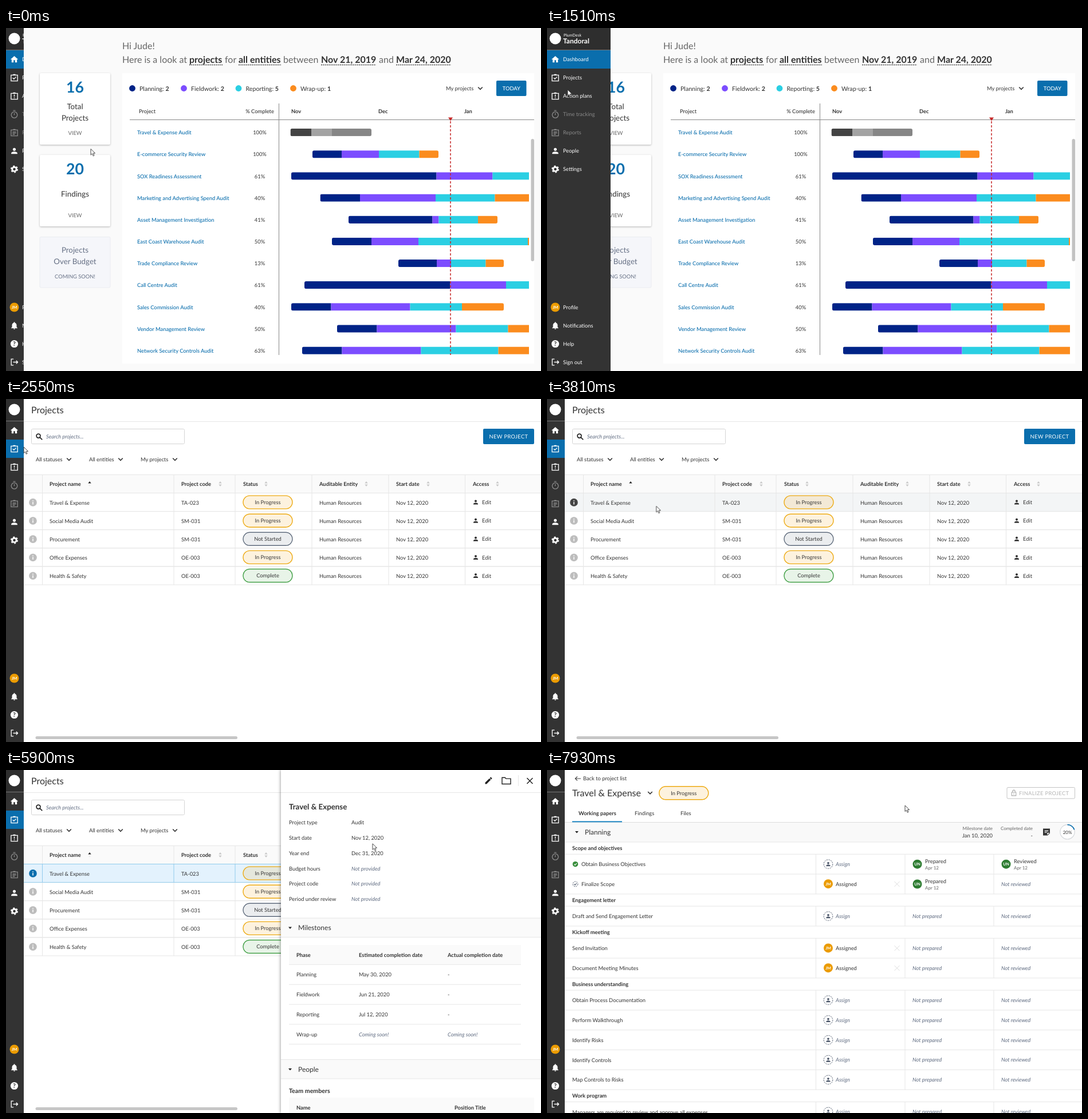
An HTML page for the animation above (8 s loop, 934 by 600 pixels).

```html
<!DOCTYPE html>
<html lang="en">
<head>
<meta charset="utf-8">
<title>Audit dashboard</title>
<style>
html, body { margin: 0; width: 100%; height: 100%; overflow: hidden; background: #fff; }
svg { display: block; width: 934px; height: 600px; }
text { font: 9.33px Lato, "Open Sans", sans-serif; fill: #333; text-rendering: geometricPrecision; white-space: pre; }
.b { font-weight: 700; }
.h { font-weight: 500; }
.i { font-style: italic; fill: #5f6b80; }
.m { text-anchor: middle; }
.e { text-anchor: end; }
.w { fill: #fff; }
.blue { fill: #0a6ead; }
.soft { fill: #666; }
.slate { fill: #667085; }
.caps { letter-spacing: .37px; }
.s7 { font-size: 7px; }
.s8 { font-size: 8px; }
.s11 { font-size: 10.67px; }
.s12 { font-size: 12px; }
.s13 { font-size: 13.33px; }
.s16 { font-size: 16px; }
.s27 { font-size: 26.67px; }
.card { filter: drop-shadow(0 1px 1.5px rgba(0,0,0,.28)); }
.edge { filter: drop-shadow(-1px 0 2.5px rgba(0,0,0,.35)); }

#drawer, .layer, #hover, #chosen, #panel, #detail, #cx, #cy, #ring { animation: 8s linear infinite; }
#drawer { animation-name: drawer; }
.layer { animation-name: dissolve; }
#hover { animation-name: hover; }
#chosen { animation-name: chosen; }
#panel { animation-name: panel; }
#detail { animation-name: detail; animation-timing-function: step-end; }
#ring { animation-name: ring; animation-timing-function: step-end; }
#cx { animation-name: cx; }
#cy { animation-name: cy; }

@keyframes drawer {
  0%, 8.75% { clip-path: inset(0 80px 0 0); animation-timing-function: ease-in-out; }
  13.5%, 100% { clip-path: inset(0 0 0 0); }
}
@keyframes dissolve { 0%, 27.5% { opacity: 0; } 31.5%, 100% { opacity: 1; } }
@keyframes hover {
  0%, 42.5% { opacity: 0; }
  43.5%, 58.375% { opacity: 1; animation-timing-function: cubic-bezier(.65,0,.35,1); }
  64.5%, 100% { opacity: 0; }
}
@keyframes chosen {
  0%, 58.375% { opacity: 0; animation-timing-function: cubic-bezier(.65,0,.35,1); }
  64.5%, 100% { opacity: 1; }
}
@keyframes panel {
  0%, 58.3% { transform: translateX(480px); }
  58.375% { transform: translateX(454px); animation-timing-function: cubic-bezier(.65,0,.35,1); }
  64.5%, 100% { transform: none; }
}
@keyframes detail { 0% { opacity: 0; } 89.625%, 100% { opacity: 1; } }
@keyframes ring {
  0%, 28% { opacity: 0; }
  25.625%, 87.375% { opacity: 1; }
  89.625%, 100% { opacity: 0; }
}
@keyframes cx {
  0%, .75% { transform: translateX(148px); animation-timing-function: cubic-bezier(.4,0,.5,.97); }
  18.875% { transform: translateX(36px); animation-timing-function: ease-out; }
  21.9%, 36% { transform: translateX(31px); animation-timing-function: ease-in-out; }
  46.25% { transform: translateX(196px); animation-timing-function: ease-in-out; }
  56.6%, 66.9% { transform: translateX(50px); animation-timing-function: cubic-bezier(.4,0,.8,.85); }
  73.75% { transform: translateX(639px); animation-timing-function: cubic-bezier(.33,.45,.67,.85); }
  77.5% { transform: translateX(836px); animation-timing-function: ease-out; }
  83.5%, 96% { transform: translateX(874px); animation-timing-function: ease-in; }
  99.1%, 100% { transform: translateX(625px); }
}
@keyframes cy {
  0%, .75% { transform: translateY(211.5px); animation-timing-function: cubic-bezier(.5,0,.7,.85); }
  18.875% { transform: translateY(108px); animation-timing-function: ease-out; }
  21.9%, 36% { transform: translateY(84px); animation-timing-function: ease-in-out; }
  45.5% { transform: translateY(188px); animation-timing-function: ease-in-out; }
  56.6%, 66.9% { transform: translateY(180px); animation-timing-function: ease-in; }
  73.75% { transform: translateY(129px); }
  77.5% { transform: translateY(61px); animation-timing-function: ease-out; }
  83.5%, 96% { transform: translateY(14px); animation-timing-function: ease-in; }
  99.1%, 100% { transform: translateY(62px); }
}
</style>
</head>
<body>
<svg id="stage" viewBox="0 0 934 600" xmlns="http://www.w3.org/2000/svg"></svg>
<script>
const BLUE = '#0a6ead', ORANGE = '#eb9b00', GREEN = '#2e7d32', LINE = '#e6e6e6', INK = '#333';

// Drawing helpers; text is centred vertically on y.
const text = (x, y, s, cls = '') => `<text x="${x}" y="${y}" dy=".355em" class="${cls}">${s}</text>`;
const rect = (x, y, x2, y2, fill, more = '') =>
  `<rect x="${x}" y="${y}" width="${x2 - x}" height="${y2 - y}" fill="${fill}" ${more}/>`;
const path = (d, stroke, width = 1, more = '') =>
  `<path d="${d}" fill="none" stroke="${stroke}" stroke-width="${width}" ${more}/>`;
const fill = (d, color) => `<path d="${d}" fill="${color}"/>`;
const dot = (x, y, r, color, more = '') => `<circle cx="${x}" cy="${y}" r="${r}" fill="${color}" ${more}/>`;
const hline = (x, x2, y, color = LINE) => path(`M${x} ${y}H${x2}`, color);
const vline = (x, y, y2, color = LINE) => path(`M${x} ${y}V${y2}`, color);
const layer = s => `<g class="layer">${s}</g>`;
const each = (list, fn) => list.map(fn).join('');
const chevron = (x, y) => path(`M${x - 3.8} ${y - 2}l3.8 3.8 3.8-3.8`, INK, 1.6);
const caret = (x, y) => fill(`M${x - 3} ${y - 1.5}h6l-3 3.4z`, '#222');
const badge = (x, y, s, color) => dot(x, y, 8, color) + text(x, y, s, 'b s7 w m');

// Icons on a 24-unit grid.
const SHAPES = {
  home: 'M10 20v-6h4v6h5v-8h3L12 3 2 12h3v8z',
  person: 'M12 12c2.2 0 4-1.8 4-4s-1.8-4-4-4-4 1.8-4 4 1.8 4 4 4zm0 2c-2.7 0-8 1.3-8 4v2h16v-2c0-2.7-5.3-4-8-4z',
  bell: 'M12 22c1.1 0 2-.9 2-2h-4c0 1.1.9 2 2 2zm6-6v-5c0-3.1-1.6-5.6-4.5-6.3V4a1.5 1.5 0 0 0-3 0v.7C7.6 5.4 6 7.9 6 11v5l-2 2v1h16v-1z',
  pencil: 'M3 17.2V21h3.8L17.8 9.9l-3.7-3.7zM20.7 7c.4-.4.4-1 0-1.4l-2.3-2.3c-.4-.4-1-.4-1.4 0l-1.9 1.8 3.8 3.8z',
  note: 'M3 3h18v12l-6 6H3zM7 8v2h10V8zM7 12v2h6v-2zM14 20l6-6h-6z'
};
const STROKES = {
  tasks: 'M3.5 5h17v15.500h-17zM9 3.500h6M8 12.500l3 3 5.500-6',
  plans: 'M3.5 5h17v15.500h-17zM9 3.500h6M12 8v5.500M12 15.500v2',
  report: 'M3.5 5h17v15.500h-17zM9 3.500h6M7.500 10h9M7.500 13h9M7.500 16.500h6',
  timer: 'M12 5.500a8 8 0 1 0 .01 0M12 9v5M9 2h6',
  out: 'M10 4H4v16h6M9 12h12M17 8l4 4-4 4',
  search: 'M9.500 3.500a6 6 0 1 0 .01 0M14 14l7 7',
  folder: 'M2 5h7l2 2.500h11V20H2z',
  lock: 'M5 10h14v11H5zM8 10V7a4 4 0 0 1 8 0v3M12 14v3'
};
function icon(name, x, y, color, size = 16, width = 2) {
  const body = SHAPES[name]
    ? `<path d="${SHAPES[name]}" fill="${color}" fill-rule="evenodd"/>`
    : path(STROKES[name], color, width);
  return `<g transform="translate(${x - size / 2} ${y - size / 2}) scale(${size / 24})">${body}</g>`;
}
const gear = (x, y) =>
  `<circle cx="${x}" cy="${y}" r="3.7" fill="none" stroke="#fff" stroke-width="2.8"/>` +
  `<circle cx="${x}" cy="${y}" r="5.600" fill="none" stroke="#fff" stroke-width="1.8" stroke-dasharray="2.93"/>`;

// Sidebar
const NAV = [['home', 'Dashboard'], ['tasks', 'Projects'], ['plans', 'Action plans'], ['timer', 'Time tracking'],
  ['report', 'Reports'], ['person', 'People'], ['gear', 'Settings']];
const FOOT = [['me', 'Profile'], ['bell', 'Notifications'], ['help', 'Help'], ['out', 'Sign out']];
function sidebar(active, wide) {
  const w = wide ? 111 : 31;
  const glyph = (name, y) => {
    if (name === 'gear') return gear(14.5, y);
    if (name === 'me') return badge(14.5, y, 'JM', ORANGE);
    if (name === 'help') return dot(14.5, y, 6.6, '#fff') + `<text x="14.5" y="${y}" dy=".355em" class="b m s11">?</text>`;
    return icon(name, 14.5, y, '#fff');
  };
  const item = ([name, label], y) =>
    `<g opacity="${name === 'timer' || name === 'report' ? .42 : 1}">${glyph(name, y)}${wide ? text(28, y, label, 'w') : ''}</g>`;
  return rect(0, 0, w, 600, '#333') + rect(0, 0, w, 38, '#2e2e2e') + hline(0, w, 38.5, '#777') +
    dot(14.5, 18.5, 10, '#fff') +
    (wide ? text(29, 13, 'PlumDesk', 's7 w') + text(28, 23, 'Tandoral', 'b s12 w') : '') +
    (active < 0 ? '' : rect(0, 39 + 32 * active, w, 71 + 32 * active, BLUE)) +
    each(NAV, (n, i) => item(n, 55 + 32 * i)) + each(FOOT, (n, i) => item(n, 488.5 + 32 * i));
}

// Dashboard
const PHASES = ['#002387', '#7c4dff', '#2bcfe3', '#fb8c1e'];
const GREYS = ['#434343', '#a3a3a3', '#868686'];
const BARS = [
  ['Travel &amp; Expense Audit', 100, 496.5, 533.5, 569, 638],
  ['E-commerce Security Review', 100, 535, 586, 651, 721.5, 755],
  ['SOX Readiness Assessment', 61, 498, 751.5, 849.5, 913],
  ['Marketing and Advertising Spend Audit', 40, 548.5, 618, 750, 853.5, 913],
  ['Asset Management Investigation', 41, 598, 744.5, 755.5, 824, 858],
  ['East Coast Warehouse Audit', 50, 569, 638, 720, 911, 913],
  ['Trade Compliance Review', 13, 685, 752, 777, 837.5, 869],
  ['Call Centre Audit', 61, 521, 775.5, 873, 913],
  ['Sales Commission Audit', 40, 498, 567.5, 705.5, 796, 869],
  ['Vendor Management Review', 50, 578, 647.5, 785.5, 876.5, 913],
  ['Network Security Controls Audit', 63, 517, 586.5, 724.5, 859.5, 913]
];
function bar([name, done, ...x], i) {
  const y = 183 + 38.15 * i, colors = i ? PHASES : GREYS;
  const right = x[x.length - 1] < 913 ? 3 : 0;
  const parts = each(x.slice(1), (end, k) => rect(x[k], y - 7, end, y + 6.3, colors[k]));
  return text(229, y, name, 'h blue') + text(443, y, done + '%', 'm') +
    `<g style="clip-path:inset(0 round 3px ${right}px ${right}px 3px)">${parts}</g>`;
}
function dashboard() {
  const card = (y, y2) => rect(59, y, 182, y2, '#fff', 'rx="2" class="card"');
  const under = (x, x2) => path(`M${x} 64.5H${x2}`, '#444', 1.3, 'stroke-dasharray="2 1.3"');
  const plain = [[203, 'Here is a look at'], [382, 'for'], [484, 'between'], [651, 'and']];
  const strong = [[320, 379, 'projects'], [406, 480, 'all entities'], [550, 646, 'Nov 21, 2019'], [681, 777, 'Mar 24, 2020']];
  const legend = [[220.5, 'Planning', 2], [310.5, 'Fieldwork', 2], [406, 'Reporting', 5], [501.5, 'Wrap-up', 1]];
  return rect(0, 0, 934, 600, '#fafafa') + text(203, 31, 'Hi Jude!', 's16 soft') +
    each(plain, ([x, s]) => text(x, 55, s, 's16 soft')) +
    each(strong, ([x, x2, s]) => text(x, 55, s, 's16 b') + under(x, x2)) +
    card(79, 204) + text(120.5, 104, '16', 's27 b blue m') + text(120.5, 137, 'Total', 's13 m') +
    text(120.5, 157, 'Projects', 's13 m') + text(120.5, 184, 'VIEW', 'soft m') +
    card(222, 347) + text(120.5, 247, '20', 's27 b blue m') + text(120.5, 290.5, 'Findings', 's13 m') +
    text(120.5, 327.5, 'VIEW', 'soft m') +
    rect(59, 365.5, 182, 454, '#f5f6fa', 'rx="2" stroke="#eaecf1"') + text(120.5, 388, 'Projects', 's13 slate m') +
    text(120.5, 408, 'Over Budget', 's13 slate m') + text(120.5, 435, 'COMING SOON!', 'slate m') +
    rect(203, 79, 922, 587, '#fff') +
    each(legend, ([x, s, n], i) => dot(x, 105.5, 5.4, PHASES[i]) +
      text(x + 12.5, 106, `${s}: <tspan class="b">${n}</tspan>`, 's11')) +
    text(768, 106, 'My projects') + chevron(828, 105.5) +
    rect(856, 92, 908.5, 119, BLUE, 'rx="2"') + text(882.3, 106, 'TODAY', 'h w m') +
    text(232, 145.5, 'Project', 'h') + text(443, 145.5, '% Complete', 'h m') +
    each([[498, 'Nov'], [650, 'Dec'], [800, 'Jan']], ([x, s]) => text(x, 145.5, s, 'b')) +
    hline(216, 922, 160.5, '#888') + vline(476.5, 132, 572, '#888') + each(BARS, bar) +
    fill('M772 156.500h8l-4 6z', '#c62828') + path('M776 163V572', '#c62828', 1.5, 'stroke-dasharray="4 3"') +
    rect(916.5, 194, 922, 408, '#c2c2c2', 'rx="2.7"');
}

// Project list
const STATES = {
  'In Progress': ['#edaa12', 'rgba(235,155,0,.13)'],
  'Not Started': ['#5f6b7c', 'rgba(95,107,124,.12)'],
  'Complete': ['#43a047', 'rgba(67,160,71,.12)']
};
const pill = (x, y, s) =>
  rect(x, y - 11.5, x + 86, y + 11.5, STATES[s][1], `rx="11.5" stroke="${STATES[s][0]}" stroke-width="1.4"`) + text(x + 43, y, s, 'm');
const COLS = [63.5, 293, 400, 534, 668, 801.5];
const PROJECTS = [['Travel &amp; Expense', 'TA-023', 'In Progress'], ['Social Media Audit', 'SM-031', 'In Progress'],
  ['Procurement', 'SM-031', 'Not Started'], ['Office Expenses', 'OE-003', 'In Progress'],
  ['Health &amp; Safety', 'OE-003', 'Complete']];
function projectRow([name, code, state], i, bg = 'none', line = LINE, info = '#bdbdbd') {
  const top = 164.5 + 32.1 * i, end = top + 32.1, y = top + 16.4;
  return rect(31, top, 934, end, bg) + hline(31, 934, top, line) + hline(31, 934, end, line) +
    each(COLS, x => vline(x, top, end, line)) +
    dot(47, y, 6.8, info) + path(`M47 ${y - .9}v4.500M47 ${y - 3.7}v1.6`, '#fff', 1.5) +
    text(76, y + .3, name) + text(306, y + .3, code) + pill(414, y - .3, state) + text(547, y + .3, 'Human Resources') +
    text(681, y + .3, 'Nov 12, 2020') + icon('person', 820, y - .3, INK, 12) + text(831, y, 'Edit');
}
function sorter(x, active) {
  const y = 148.5;
  return fill(`M${x - 2.7} ${y - 1}l2.700-3.400 2.700 3.400z`, active ? '#222' : '#c8c8c8') +
    fill(`M${x - 2.7} ${y + 1}l2.700 3.400 2.700-3.400z`, active ? '#eee' : '#c8c8c8');
}
function projects() {
  const heads = [[76, 'Project name', 146], [306, 'Project code', 374], [414, 'Status', 454],
    [547, 'Auditable Entity', 629], [681, 'Start date', 737], [815, 'Access', 858]];
  const filters = [[52, 'All statuses', 110], [145, 'All entities', 200], [235, 'My projects', 295]];
  return layer(rect(0, 0, 934, 600, '#fff')) + layer(rect(31, 0, 934, 39, '#fff') + hline(31, 934, 39.5)) +
    layer(rect(31, 132, 934, 325, '#fff') + rect(31, 132, 934, 164.5, '#fafafa')) +
    layer(text(44, 19.5, 'Projects', 's16') +
      rect(44.5, 52.5, 311.5, 78.5, '#fff', 'rx="2" stroke="#d4d4d4"') + icon('search', 58, 66, '#222', 14, 3) +
      text(70, 66, 'Search projects...', 'i') +
      rect(833, 52, 922, 79, BLUE, 'rx="2"') + text(877.5, 66, 'NEW PROJECT', 'caps w m') +
      each(filters, ([x, s, c]) => text(x, 106, s) + chevron(c, 105.5)) + hline(31, 934, 132.5) +
      each(COLS, x => vline(x, 132.5, 164.5)) +
      each(heads, ([x, s, at], i) => text(x, 149, s, 'b') + sorter(at, !i)) +
      each(PROJECTS, (p, i) => projectRow(p, i)) + rect(51.5, 590, 404, 595, '#c6c6c6', 'rx="2.5"')) +
    `<g id="chosen">${projectRow(PROJECTS[0], 0, '#e3f2fd', '#90cbec', BLUE)}</g>` +
    `<g id="panel">${panel()}</g>` +
    `<g id="hover">${projectRow(PROJECTS[0], 0, '#f3f5f6', LINE, '#444')}</g>` + layer(sidebar(1));
}

// Slide-in project summary
function panel() {
  const facts = [['Project type', 'Audit'], ['Start date', 'Nov 12, 2020'], ['Year end', 'Dec 31, 2020'],
    ['Budget hours'], ['Project code'], ['Period under review']];
  const phases = [['Planning', 'May 30, 2020'], ['Fieldwork', 'Jun 21, 2020'], ['Reporting', 'Jul 12, 2020'], ['Wrap-up']];
  const band = (y, s) => rect(480, y, 934, y + 33.5, '#fafafa') + hline(480, 934, y) + hline(480, 934, y + 33.5) +
    caret(496, y + 17) + text(510, y + 17, s, 's12');
  return rect(480, 0, 940, 600, '#fff', 'class="edge"') + hline(480, 934, 39.5) +
    icon('pencil', 842.5, 18.5, '#222', 16) + icon('folder', 873.5, 18.5, '#222', 18, 1.9) + vline(894.5, 9, 28) +
    path('M909.500 14l10 10M919.500 14l-10 10', '#222', 1.5) + text(494, 64.5, 'Travel &amp; Expense', 's13 b') +
    each(facts, ([k, v], i) => text(494, 92 + 26.75 * i, k) + text(603, 92 + 26.75 * i, v || 'Not provided', v ? '' : 'i')) +
    band(259, 'Milestones') + rect(494, 306, 899, 340, '#fafafa') + hline(494, 899, 340.3) +
    each([[507, 'Phase'], [616, 'Estimated completion date'], [771, 'Actual completion date']],
      ([x, s]) => text(x, 323.5, s, 'b')) +
    each(phases, ([s, date], i) => {
      const y = 358 + 34.8 * i, cls = date ? '' : 'i';
      return text(507, y, s) + text(616, y, date || 'Coming soon!', cls) + text(771, y, date ? '-' : 'Coming soon!', cls) +
        hline(494, 899, y + 17.2);
    }) +
    band(506.5, 'People') + text(494, 561, 'Team members', 's11 b') + rect(494, 573, 922, 600, '#fafafa') +
    text(507, 590.5, 'Name', 'b') + text(783, 590.5, 'Position Title', 'b');
}

// Project detail; a bare string is a section heading.
const PAPERS = ['Scope and objectives', ['Obtain Business Objectives', 0, 1, 1, 'done'], ['Finalize Scope', 1, 1, 0, 'open'],
  'Engagement letter', ['Draft and Send Engagement Letter'],
  'Kickoff meeting', ['Send Invitation', 1], ['Document Meeting Minutes', 1],
  'Business understanding', ['Obtain Process Documentation'], ['Perform Walkthrough'], ['Identify Risks'],
  ['Identify Controls'], ['Map Controls to Risks'],
  'Work program', ['Managers are required to review and approve all expenses']];
function paper([name, assigned, prepared, reviewed, mark], y) {
  const signed = (x, s) => badge(x + 8.5, y, 'UN', GREEN) + text(x + 22, y - 4.7, s) + text(x + 22, y + 6.300, 'Apr 12', 's8 soft');
  const ring = (x, r) => `<circle cx="${x}" cy="${y}" r="${r}" fill="none" stroke="#4a5568" stroke-dasharray="2.2 1.5"/>`;
  const tick = color => path(`M47.300 ${y}l1.700 1.700 2.900-3.200`, color, 1.1);
  return (mark === 'done' ? dot(49.5, y, 4.8, '#388e3c') + tick('#fff') : mark ? ring(49.5, 4.4) + tick('#4a5568') : '') +
    text(mark ? 60 : 44, y + .3, name) +
    (assigned ? badge(491, y - .3, 'JM', ORANGE) + text(504, y, 'Assigned') +
        path(`M606.500 ${y - 4.5}l9 9M615.500 ${y - 4.5}l-9 9`, '#ddd')
      : ring(491, 7.8) + icon('person', 491, y, '#4a5568', 11) + text(504, y, 'Assign', 'i')) +
    (prepared ? signed(638, 'Prepared') : text(638, y, 'Not prepared', 'i')) +
    (reviewed ? signed(793, 'Reviewed') : text(793, y, 'Not reviewed', 'i'));
}
function detail() {
  let y = 126;
  const rows = each(PAPERS, p => {
    const top = y, heading = typeof p === 'string';
    y += heading ? 21.3 : 34.8;
    return hline(31, 934, y) + (heading ? text(44, top + 10.8, p, 'b')
      : each([469.5, 625, 780], x => vline(x, top, y)) + paper(p, top + 17.4));
  });
  const arc = 2 * Math.PI * 12.7;
  return rect(0, 0, 934, 600, '#fff') + path('M59 15H49.500M53 11.300L49.300 15l3.700 3.700', '#444', 1.2) +
    text(63, 15, 'Back to project list') + text(44, 40.5, 'Travel &amp; Expense', 's16') + chevron(180, 40) +
    pill(195.8, 40.3, 'In Progress') + rect(803, 30.5, 921.5, 50, '#fff', 'rx="2" stroke="#c4c4c4"') +
    icon('lock', 815, 40, '#aaa', 13) + text(824, 40.5, 'FINALIZE PROJECT', 'caps" style="fill:#b4b4b4') +
    text(55, 76, 'Working papers', 'b') + text(153, 76, 'Findings') + text(233, 76, 'Files') +
    rect(31, 91.5, 934, 126, '#f9f9f9') + hline(31, 934, 91.5, '#ddd') + hline(31, 934, 126) +
    rect(44, 89.5, 131, 91.3, '#0d7fc0') + caret(52, 108.5) + text(66, 109, 'Planning', 's12') +
    text(778, 102, 'Milestone date', 's8 e soft') + text(778, 114.5, 'Jan 10, 2020', 'e') +
    text(848, 102, 'Completed date', 's8 e soft') + text(848, 114.5, '-', 'e') + icon('note', 872, 108.5, INK, 16) +
    dot(908.5, 108.3, 12.7, '#fff', 'stroke="#d5d8dc" stroke-width="1.2"') +
    dot(908.5, 108.3, 12.7, 'none', `stroke="${BLUE}" stroke-width="1.6" stroke-dasharray="${arc * .2} ${arc}" transform="rotate(-90 908.5 108.3)"`) +
    text(908.5, 108.8, '20%', 's8 m') + rows + sidebar(-1);
}

const pointer = '<g id="cx"><g id="cy"><circle id="ring" r="8" fill="rgba(90,90,90,.35)"/>' +
  '<path d="M0 0V10.500L2.500 8.300 4.200 12.300 6 11.500 4.300 7.700 7.600 7.500Z" fill="#fff" stroke="#333" stroke-width=".9"/></g></g>';

document.getElementById('stage').innerHTML =
  dashboard() + `<g id="drawer">${sidebar(0, true)}</g>` + projects() + `<g id="detail">${detail()}</g>` + pointer;
</script>
</body>
</html>
```
